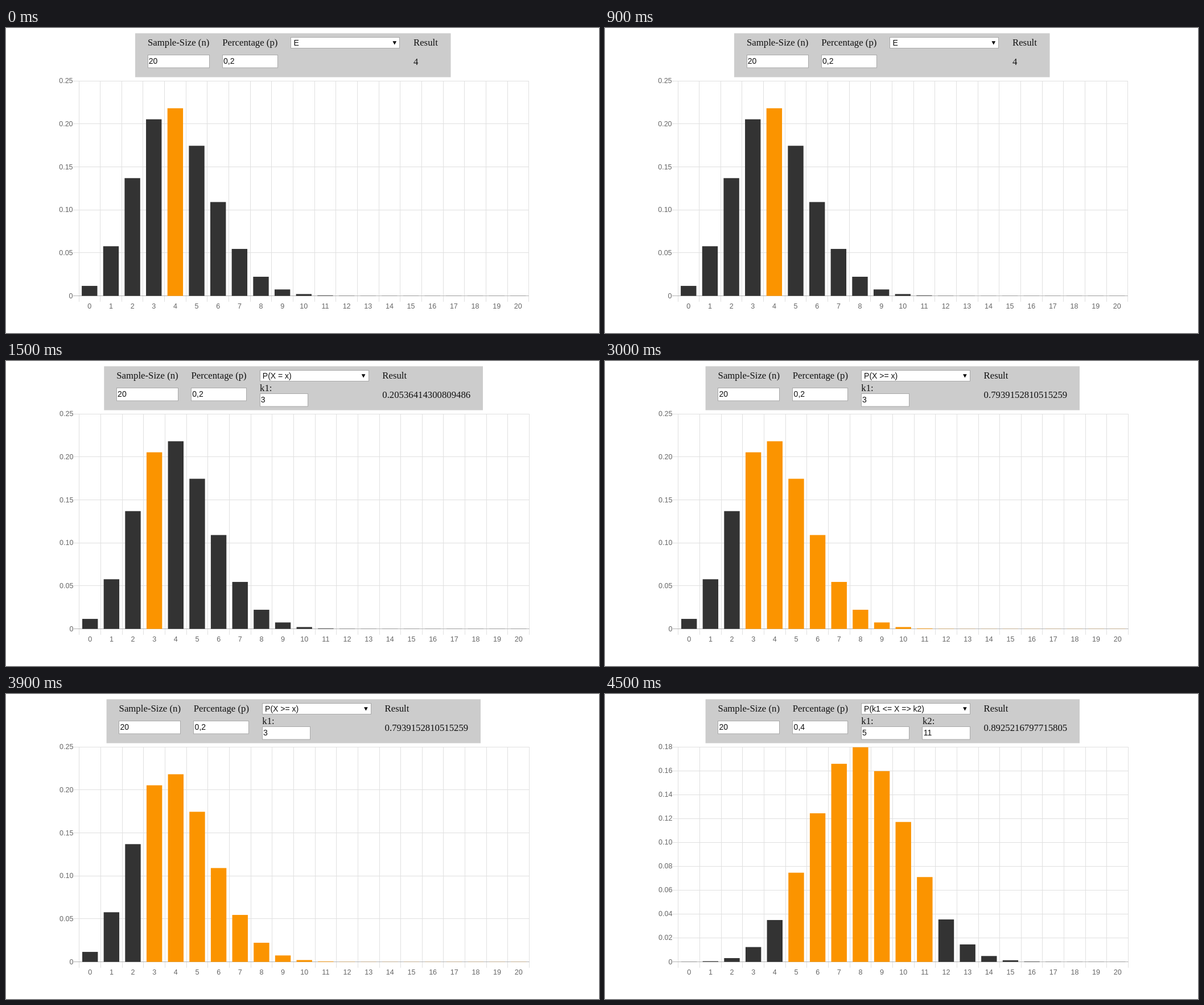
Write an HTML page that moves like this. It is 1042 by 537 pixels and loops after 6 s.

```html
<!DOCTYPE html>
<html lang="en">
<head>
<meta charset="utf-8">
<title>Binomial distribution</title>
<style>
  html, body { margin: 0; width: 100%; height: 100%; overflow: hidden; background: #fff; }
  svg { display: block; width: 1042px; height: 537px; }
  .scene { visibility: hidden; animation: show 6s step-end infinite; }
  @keyframes show {
    0% { visibility: visible; }
    25%, 100% { visibility: hidden; }
  }
  .label { font: 16.75px "Liberation Serif", "Times New Roman", serif; fill: #111; }
  .field { font: 14px "Liberation Sans", Arial, sans-serif; fill: #111; }
  .tick { font: 12.56px "Liberation Sans", Arial, sans-serif; fill: #666; }
  .end { text-anchor: end; }
  .mid { text-anchor: middle; }
  .panel { fill: #ccc; }
  .box { fill: #fff; stroke: #a9a9a9; }
  .grid { stroke: #e0e0e0; }
  .axis { stroke: #b4b4b4; }
  .bar { fill: #333; }
  .hit { fill: #fb9400; }
</style>
</head>
<body>
<svg id="stage" viewBox="0 0 1042 537"></svg>
<script>
const N = 20, TOP = 93.2, BASE = 471.5, STEP = 37.65;

const scenes = [
  { left: 249, right: 781.5, plot: 128, p: 0.2, max: 0.25, tick: 0.05,
    mode: 'E', result: '4', from: 4, to: 4, keys: [] },
  { left: 194.3, right: 838, plot: 128.9, p: 0.2, max: 0.25, tick: 0.05,
    mode: 'P(X = x)', result: '0.20536414300809486', from: 3, to: 3, keys: [3] },
  { left: 198.6, right: 834, plot: 128.9, p: 0.2, max: 0.25, tick: 0.05,
    mode: 'P(X >= x)', result: '0.7939152810515259', from: 3, to: N, keys: [3] },
  { left: 198.6, right: 834, plot: 128.9, p: 0.4, max: 0.18, tick: 0.02,
    mode: 'P(k1 <= X => k2)', result: '0.8925216797715805', from: 5, to: 11, keys: [5, 11] }
];

const escapeText = s => String(s).replace(/</g, '&lt;').replace(/>/g, '&gt;');
const text = (cls, x, y, s) => `<text class="${cls}" x="${x}" y="${y}">${escapeText(s)}</text>`;
const rect = (cls, x, y, w, h) => `<rect class="${cls}" x="${x}" y="${y}" width="${w}" height="${h}"/>`;
const line = (cls, x1, y1, x2, y2) => `<line class="${cls}" x1="${x1}" y1="${y1}" x2="${x2}" y2="${y2}"/>`;
const crisp = v => Math.floor(v) + 0.5;

const input = (x, y, w, value) =>
  rect('box', crisp(x), y + 0.5, w, 22.5) + text('field', x + 1.8, y + 16, value);

function binomial(p) {
  const probs = [(1 - p) ** N];
  for (let k = 1; k <= N; k++) probs.push(probs[k - 1] * (N - k + 1) / k * p / (1 - p));
  return probs;
}

function form(s) {
  const pX = s.left + 131.2, modeX = s.left + 251.7, resultX = s.left + 467;
  const arrow = modeX + 178.8;
  let out = rect('panel', s.left - 22, 9.3, s.right - s.left + 22, 77.3);
  out += text('label', s.left, 31, 'Sample-Size (n)') + input(s.left, 47, 108, N);
  out += text('label', pX, 31, 'Percentage (p)');
  out += input(pX, 47, 97, String(s.p).replace('.', ','));
  out += rect('box', crisp(modeX), 16.5, 191, 19) + text('field', modeX + 4.8, 30.5, s.mode);
  out += `<path d="M${arrow} 23.2h6.6l-3.3 6.2z"/>`;
  s.keys.forEach((key, i) => {
    const x = modeX + i * 107.6;
    out += text('label', x, 53, `k${i + 1}:`) + input(x, 57, 84, key);
  });
  return out + text('label', resultX, 31, 'Result') + text('label', resultX, 64.5, s.result);
}

function chart(s) {
  const right = s.plot + STEP * (N + 1);
  const scale = (BASE - TOP) / s.max;
  const count = Math.round(s.max / s.tick);
  let out = '';
  for (let i = 0; i <= N + 1; i++) {
    const x = crisp(s.plot + i * STEP);
    out += line('grid', x, TOP, x, 482);
  }
  for (let i = 0; i <= count; i++) {
    const y = BASE - i * s.tick * scale;
    out += line(i ? 'grid' : 'axis', s.plot - 10, crisp(y), right, crisp(y));
    out += text('tick end', s.plot - 10.4, y + 4, i ? (i * s.tick).toFixed(2) : '0');
  }
  binomial(s.p).forEach((prob, k) => {
    const x = s.plot + k * STEP, h = prob * scale;
    const hit = k >= s.from && k <= s.to;
    out += rect(hit ? 'hit' : 'bar', x + 5.1, BASE - h, 27.4, h + 0.2);
    out += text('tick mid', x + STEP / 2, 493.8, k);
  });
  return out;
}

document.getElementById('stage').innerHTML = scenes.map((s, i) =>
  `<g class="scene" style="animation-delay:${i ? i * 1.5 - 6 : 0}s">${form(s)}${chart(s)}</g>`
).join('');
</script>
</body>
</html>
```
